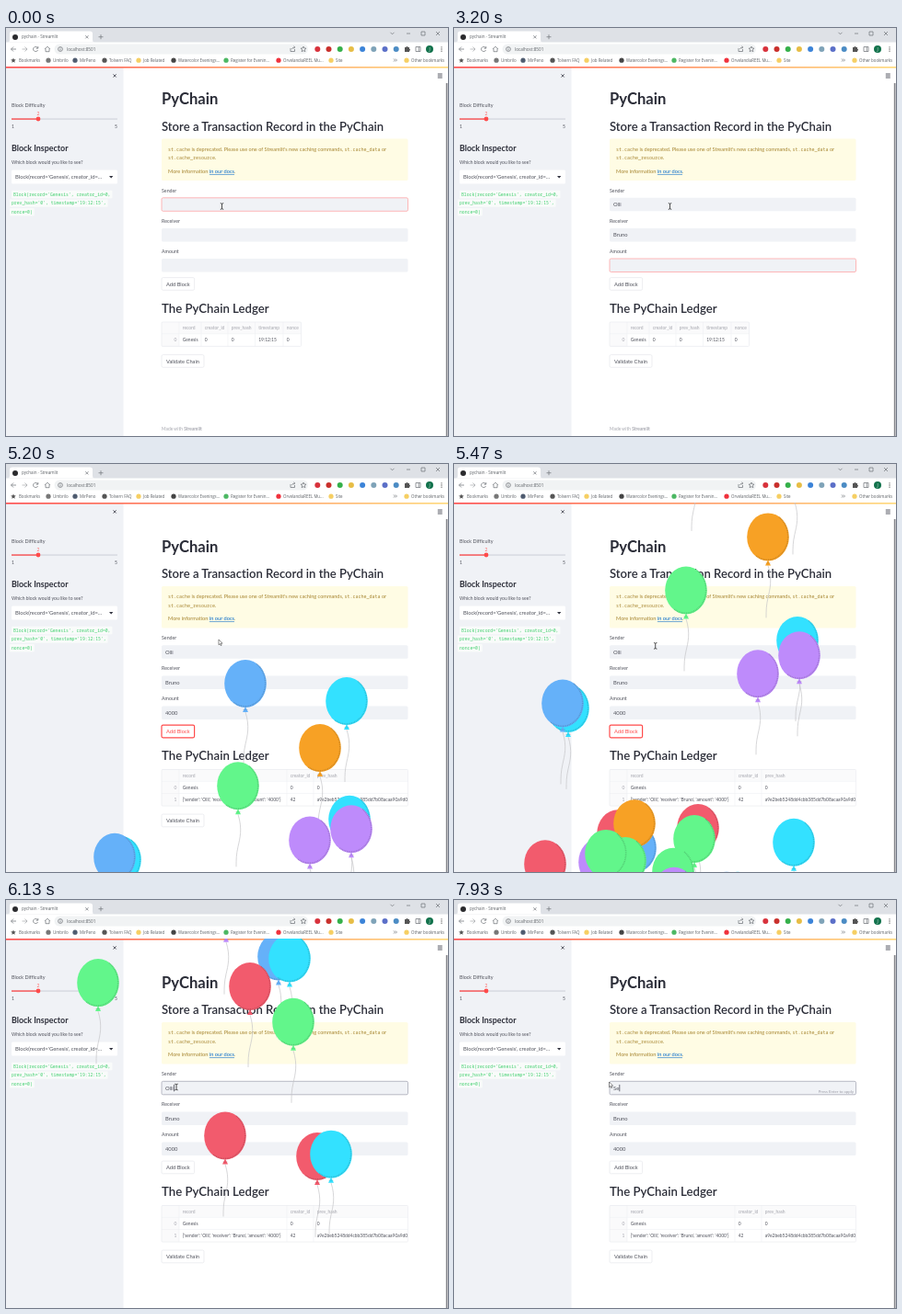
Animation of 480 by 444 pixels, one loop 8000 ms. Source, as an HTML page:

```html
<!DOCTYPE html>
<html lang="en">
<head>
<meta charset="utf-8">
<title>PyChain</title>
<style>
  html, body { margin: 0; width: 100%; height: 100%; overflow: hidden; background: #fff; }
  svg { display: block; width: 100vw; height: 100vh; }
  text { font-family: Lato, "Open Sans", sans-serif; fill: #50525c; white-space: pre; font-variant-ligatures: none; }
  text[font-weight] { fill: #2b2d38; }
  .ui { font-family: "Open Sans", "Noto Sans", sans-serif; fill: #5c6065; }
  .mono { font-family: "Noto Sans Mono", "DejaVu Sans Mono", monospace; }
  .line { fill: none; stroke: #7a7e83; stroke-width: .8; }
</style>
</head>
<body>
<svg id="stage" viewBox="0 0 480 444"></svg>
<script>
const LOOP = 8000, LAYOUT_AT = 4730, SHIFT = 12.5, COLUMN_WIDTH = 267.5;
const SENDER = "Olli", RECEIVER = "Bruno";

// Markup helpers; text is placed by its vertical centre.
const text = (x, y, size, str, attrs = "") =>
  `<text x="${x}" y="${y + size * .35}" font-size="${size}" ${attrs}>${str}</text>`;
const rect = (x, y, w, h, fill, attrs = "") =>
  `<rect x="${x}" y="${y}" width="${w}" height="${h}" fill="${fill}" ${attrs}/>`;
const dot = (x, y, r, fill) => `<circle cx="${x}" cy="${y}" r="${r}" fill="${fill}"/>`;
const line = (d, attrs = "") => `<path class="line" d="${d}" ${attrs}/>`;
const group = (id, body, attrs = "") => `<g id="${id}" ${attrs}>${body}</g>`;

function browserChrome() {
  const bookmarks = [
    [46, "#777", "Umbrilo"], [75, "#4f5c70", "MirPeno"], [107, "#555", "Tolvern FAQ"],
    [144, "#f6cf63", "Job Related"], [182, "#444", "Watercolor Evenings..."],
    [239, "#4cb863", "Register for Evenin..."], [296, "#f0313c", "OrvelandiaREEL Mu..."],
    [353, "#f6cf63", "Site"], [435, "#f6cf63", "Other bookmarks"]
  ].map(([x, color, label]) =>
    dot(x, 35.2, 2.6, color) + text(x + 5, 35.2, 4.4, label, 'class="ui"')).join("");
  const extensions = ["#d8323c", "#c9302c", "#35b04a", "#e7bd45", "#3b83d8", "#7fa3b8", "#5b6fc8", "#4b8cc4"]
    .map((color, i) => dot(338.3 + i * 12.2, 23, 3, color)).join("");
  return rect(0, 0, 480, 42, "#fff") + rect(0, 0, 480, 15.5, "#dee1e6")
    + `<path d="M2 15.5Q4 15.5 4 13V6Q4 3.5 7 3.5H91Q94 3.5 94 6V13Q94 15.5 96 15.5Z" fill="#fff"/>`
    + dot(10, 10, 3, "#2b2b2e") + text(17, 9.8, 4.6, "pychain · Streamlit", 'class="ui"')
    + line("M86.3 8.2l3.2 3.2m0-3.2l-3.2 3.2M100.5 9.7h5M103 7.2v5")
    + line("M417.5 4.8l2 2 2-2M435 6h4M451 4h4v4h-4zM467 4l4 4m0-4l-4 4")
    + line("M11 23H5.5m2.5-2.5L5.5 23 8 25.5M34.6 22a2.6 2.6 0 1 0 0 2M34.8 20v2.2h-2.2M42 23l3-2.8 3 2.8M43 22.5v3.2h4v-3.2")
    + line("M17.5 23H23m-2.5-2.5L23 23l-2.5 2.5", 'opacity=".6"')
    + rect(52.5, 17.5, 275.5, 11, "#f1f3f4", 'rx="5.5"')
    + `<circle cx="59" cy="23" r="2.4" class="line"/>` + line("M59 22.5v2M59 21.3v.6", 'stroke-width=".7"')
    + text(66, 22.9, 4.65, "localhost:8501", 'class="ui"')
    + line("M309 22v3.5h4.5V23M310.5 23q.5-2 3-2m-1-1.2l1.4 1.2-1.4 1.2")
    + line("M323 20l.9 2 2.1.2-1.6 1.4.5 2.1-1.9-1.1-1.9 1.1.5-2.1-1.6-1.4 2.1-.2z")
    + extensions
    + `<path d="M433 21h1.5a1 1 0 0 1 2 0H438v1.8a1 1 0 0 1 0 2V26h-5z" fill="#555"/>`
    + line("M445 20.5h5v5h-5zM448.2 20.5v5") + dot(460, 23, 4, "#12724c")
    + text(460, 23, 4.4, "J", 'class="ui" text-anchor="middle" style="fill:#fff"')
    + [20.8, 23, 25.2].map(y => dot(473, y, .65, "#555")).join("")
    + `<path d="M8 32.4l.8 1.9 2 .2-1.5 1.3.4 2-1.7-1-1.7 1 .4-2-1.5-1.3 2-.2z" fill="#555"/>`
    + text(14, 35.2, 4.4, "Bookmarks", 'class="ui"') + bookmarks
    + line("M421 33.5l1.5 1.5-1.5 1.5M423 33.5l1.5 1.5-1.5 1.5");
}

function sidebar() {
  const code = ["Block(record='Genesis', creator_id=0,", "prev_hash='0', timestamp='19:12:15',", "nonce=0)"]
    .map((row, i) => {
      const x = i ? 6 : 8, y = 181 + i * 9.6;
      return rect(x - 2, y - 4.2, row.length * 2.85 + 4, 8.4, "#f9fbfa", 'rx="1"')
        + text(x, y, 4.75, row, 'class="mono" style="fill:#3fcf6d"');
    }).join("");
  return rect(0, 42, 127.5, 402, "#f0f2f6")
    + line("M116.5 50.3l3.2 3.2m0-3.2l-3.2 3.2", 'style="stroke:#31333f"')
    + text(6, 84, 5.4, "Block Difficulty")
    + text(35, 93, 5, "2", 'text-anchor="middle" style="fill:#ff6b6b"')
    + rect(6, 98.4, 115, 1.3, "#d5d7df") + rect(6, 98.4, 29, 1.3, "#ff4b4b") + dot(35, 99, 2.4, "#ff4b4b")
    + text(6, 107.3, 5, "1") + text(118, 107.3, 5, "5")
    + text(6, 131, 8.9, "Block Inspector", 'font-weight="700"')
    + text(6, 146.5, 5.05, "Which block would you like to see?")
    + rect(6, 154.5, 115, 15, "#fff", 'rx="1.5"')
    + text(10, 162, 5.9, "Block(record='Genesis', creator_id=...")
    + `<path d="M112 161h4.4l-2.2 2.4z" fill="#31333f"/>` + code;
}

function field(name, label, y) {
  return text(169, y - 8, 5.3, label)
    + rect(169, y, COLUMN_WIDTH, 14.5, "#f0f2f6", `rx="1.5" id="${name}Box"`)
    + rect(0, y + 3.5, 0, 7.5, "#0078d7", `id="${name}Selection"`)
    + text(173, y + 7.2, 5.8, "", `id="${name}Text"`)
    + rect(0, y + 3.6, .7, 7.4, "#31333f", `id="${name}Caret"`)
    + text(434, y + 11, 4.4, "Press Enter to apply", `id="${name}Hint" text-anchor="end" style="fill:#9b9ca6"`);
}

const button = (id, y, w, label) =>
  rect(169, y, w, 13.7, "#fff", `id="${id}Box" rx="1.5" stroke="#e6e7eb" stroke-width=".7"`)
  + text(169 + w / 2, y + 6.9, 5.75, label, `id="${id}Text" text-anchor="middle"`);

// Columns are [left edge, heading, ...cells]; the first holds the row index.
function table(right, columns) {
  const rows = columns[0].length - 2, bottom = 320 + 13.2 * (rows + 1);
  const grid = 'style="stroke:#eff0f3;stroke-width:.6"';
  let out = rect(169, 320, right - 169, 12.8, "#fafafb") + rect(169, 320, 19, bottom - 320, "#fafafb");
  columns.forEach(([x, ...cells], col) => {
    if (col) out += line(`M${x} 320V${bottom}`, grid);
    cells.forEach((cell, row) => out += text(col ? x + 3.7 : 182.5, 326.3 + row * 13.2, 4.95, cell,
      row && col ? "" : 'style="fill:#a5a6ae"'));
  });
  for (let row = 1; row <= rows; row++) out += line(`M169 ${319.6 + row * 13.2}H${right}`, grid);
  return out + rect(169, 320, right - 169, bottom - 320, "none", 'rx="1" stroke="#eaebef" stroke-width=".7"');
}

function mainPage() {
  const code = s => `<tspan class="mono" font-size="5">${s}</tspan>`;
  const amber = 'style="fill:#a5842f"';
  const record = `{'sender': '${SENDER}', 'receiver': '${RECEIVER}', 'amount': '4000'}`;
  return text(169, 77.3, 16.6, "PyChain", 'font-weight="700"')
    + text(169, 107, 13.1, "Store a Transaction Record in the PyChain", 'font-weight="600"')
    + rect(169, 120.5, COLUMN_WIDTH, 45.5, "#fffce4", 'rx="1.5"')
    + text(176, 131.8, 5.55, `${code("st.cache")} is deprecated. Please use one of Streamlit's new caching commands, ${code("st.cache_data")} or`, amber)
    + text(176, 141.3, 5.55, code("st.cache_resource") + ".", amber)
    + text(176, 156, 5.65, 'More information <tspan fill="#0068c9" text-decoration="underline">in our docs</tspan>.', amber)
    + field("sender", "Sender", 184.8) + field("receiver", "Receiver", 218) + field("amount", "Amount", 251)
    + button("add", 271.6, 35.6, "Add Block")
    + text(169, 305.2, 13.2, "The PyChain Ledger", 'font-weight="600"')
    + group("ledgerBefore", table(320.5, [
        [169, "", "0"], [188, "record", "Genesis"], [212, "creator_id", "0"],
        [241, "prev_hash", "0"], [270.5, "timestamp", "19:12:15"], [301, "nonce", "0"]])
      + text(169, 436.5, 4.9, 'Made with <tspan font-weight="700">Streamlit</tspan>', 'style="fill:#a5a6ae"'))
    + group("ledgerAfter", table(436.5, [
        [169, "", "0", "1"], [188, "record", "Genesis", record], [305, "creator_id", "0", "42"],
        [334, "prev_hash", "0", "a9e2beb5248dd4cbb385dd7b08acaa90a9d05c1e7"]]), 'clip-path="url(#column)"')
    + group("validate", button("check", 355.6, 46, "Validate Chain"));
}

// Balloons: x centre, launch time, colour; later entries lie in front.
const COLORS = { b: "#65b1f9", c: "#33e1ff", o: "#f7a125", g: "#62f68b", p: "#be8bfb", r: "#f25b6d" };
const BALLOONS = [
  [260, 4724, "b"], [370, 4748, "c"], [341, 4816, "o"], [252, 4877, "g"], [373, 4938, "c"],
  [330, 4981, "p"], [375, 4957, "p"], [124, 5028, "c"], [118, 5021, "b"],
  [178, 5237, "r"], [197, 5269, "b"], [196, 5216, "o"], [158, 5304, "p"], [186, 5301, "g"],
  [165, 5282, "g"], [265, 5225, "r"], [261, 5248, "g"], [369, 5256, "c"], [99, 5309, "r"],
  [238, 5332, "g"], [239, 5412, "p"], [296, 5458, "b"], [308, 5460, "c"], [265, 5491, "r"],
  [100, 5487, "g"], [312, 5532, "g"], [238, 5676, "r"], [338, 5705, "r"], [353, 5702, "c"]
];
const RISE_MS = 775, RISE_FROM = 444, RISE_BY = 516;

const balloon = color => `<g class="balloon">
  <path d="M0 57c5 16 2 26 0 35s-2 14-2 22" fill="none" stroke="#c4c4c8" stroke-width=".7"/>
  <path d="M0 51l-3 6h6z" fill="${color}"/>
  <ellipse cy="26" rx="22.8" ry="26" fill="${color}"/>
  <path d="M12 4.5A22.2 25.4 0 0 1-13 46.5" fill="none" stroke="#000" stroke-opacity=".16" stroke-width="1.6" stroke-dasharray="1 .7"/>
  <path d="M-3 54.5h6" stroke="#000" stroke-opacity=".12" stroke-width=".8"/></g>`;

// CSS ease-in: cubic-bezier(.42, 0, 1, 1), solved by bisection.
function easeIn(x) {
  let lo = 0, hi = 1;
  for (let i = 0; i < 22; i++) {
    const s = (lo + hi) / 2;
    if (1.26 * s + .48 * s * s - .74 * s ** 3 < x) lo = s; else hi = s;
  }
  return 3 * lo * lo - 2 * lo ** 3;
}

document.getElementById("stage").innerHTML = `<defs>
    <linearGradient id="accent"><stop stop-color="#ff4b4b"/><stop offset="1" stop-color="#ffd97a"/></linearGradient>
    <clipPath id="page"><rect y="42" width="480" height="402"/></clipPath>
    <clipPath id="column"><rect x="168" y="300" width="268.9" height="100"/></clipPath>
  </defs>`
  + rect(0, 0, 480, 444, "#fff") + group("main", mainPage()) + sidebar()
  + rect(0, 42, 480, 1.6, "url(#accent)")
  + line("M468.8 50h5M468.8 52h5M468.8 54h5", 'style="stroke:#31333f"')
  + rect(477.8, 60, 1.7, 384, "#85868c")
  + group("running", `<circle cx="407" cy="51.5" r="3.4" class="line"/>` + line("M403 55h8M407 48v5")
    + text(415, 51.5, 5, "Running...") + text(448, 51.5, 5, "Stop"), 'opacity=".2"')
  + group("balloons", BALLOONS.map(b => balloon(COLORS[b[2]])).join(""), 'clip-path="url(#page)"')
  + browserChrome()
  + group("beam", line("M-1.7-3.3Q0-3.3 0-2.4V2.4Q0 3.3-1.7 3.3M1.7-3.3Q0-3.3 0-2.4M0 2.4Q0 3.3 1.7 3.3", 'style="stroke:#222"'))
  + group("arrow", '<path d="M0 0v5.8l1.4-1.2.9 2 .9-.4-.9-2h1.8z" fill="#fff" stroke="#222" stroke-width=".5"/>');

const el = id => document.getElementById(id);
const show = (node, on) => node.style.display = on ? "" : "none";
const within = (t, from, to) => t >= from && t < to;
const balloonNodes = [...document.querySelectorAll(".balloon")];

// Each typing run: the final text and the moment of each key.
const TYPING = {
  sender: [[SENDER, [270, 530, 800, 930]], ["Se", [7530, 7800]]],
  receiver: [[RECEIVER, [1600, 1800, 2000, 2200, 2400]]],
  amount: [["4000", [3270, 3470, 3600, 3730]]]
};
const FOCUS = [[0, "sender"], [1200, "receiver"], [2800, "amount"], [4270, "add"], [6000, "sender"]];
const POINTER = [[5070, 234.5, 194], [5200, 231, 191], [5730, 207, 204.5], [6000, 185, 203.5],
  [6200, 185, 203.5], [6530, 169, 203.5], [6670, 168.5, 198]];
const RUNNING = [[1270, 1530], [2870, 3200], [4400, LAYOUT_AT]];

function pointerAt(t) {
  const next = POINTER.findIndex(p => p[0] > t);
  if (next < 1) return POINTER[next ? POINTER.length - 1 : 0].slice(1);
  const [t0, x0, y0] = POINTER[next - 1], [t1, x1, y1] = POINTER[next];
  const k = (t - t0) / (t1 - t0);
  return [x0 + (x1 - x0) * k, y0 + (y1 - y0) * k];
}

function drawField(name, t, focused, pointerX) {
  const [word, keys] = TYPING[name].filter(run => run[1][0] <= t).pop() || ["", []];
  const typed = keys.filter(k => k <= t);
  const label = el(name + "Text"), box = el(name + "Box"), selection = el(name + "Selection");
  label.textContent = word.slice(0, typed.length);
  const end = 173 + (typed.length ? label.getComputedTextLength() : 0);

  const selecting = name === "sender" && within(t, 6200, 7530);
  const left = Math.max(173, Math.min(end, pointerX));
  selection.setAttribute("x", left);
  selection.setAttribute("width", selecting ? end - left : 0);
  label.style.fill = selecting && left < 175 ? "#fff" : "";

  const clicked = name === "sender" && within(t, 6050, 6200);
  el(name + "Caret").setAttribute("x", end + .3);
  show(el(name + "Caret"), focused && (clicked || typed.length && t - typed.at(-1) < 500));
  show(el(name + "Hint"), focused && typed.length && !within(t, 5000, 7530));
  box.setAttribute("stroke", focused ? (t < 5000 ? "#ffa6a8" : "#a9aab8") : "none");
  box.setAttribute("stroke-width", .8);
}

function draw(t) {
  const added = t >= LAYOUT_AT;
  el("main").setAttribute("transform", `translate(0 ${added ? SHIFT : 0})`);
  el("validate").setAttribute("transform", `translate(0 ${added ? 13 : 0})`);
  show(el("ledgerBefore"), !added);
  show(el("ledgerAfter"), added);
  show(el("running"), RUNNING.some(([from, to]) => within(t, from, to)));

  const focus = FOCUS.filter(f => f[0] <= t).pop()[1];
  const [px, py] = pointerAt(t);
  for (const name in TYPING) drawField(name, t, focus === name, px);
  const pressed = focus === "add";
  el("addBox").setAttribute("stroke", pressed ? "#ff4b4b" : "#e6e7eb");
  el("addBox").setAttribute("stroke-width", pressed ? 1.2 : .7);
  el("addText").style.fill = pressed ? "#ff4b4b" : "";

  const isArrow = within(t, LAYOUT_AT, 5400) || t >= 6600;
  for (const id of ["beam", "arrow"]) el(id).setAttribute("transform", `translate(${px} ${py})`);
  show(el("arrow"), isArrow);
  show(el("beam"), !isArrow);

  BALLOONS.forEach(([x, start], i) => {
    const k = (t - start) / RISE_MS, node = balloonNodes[i];
    show(node, k > 0 && k < 1);
    node.setAttribute("transform", `translate(${x} ${RISE_FROM - RISE_BY * easeIn(k)})`);
  });
}

const startTime = performance.now();
function frame() {
  draw((performance.now() - startTime) % LOOP);
  requestAnimationFrame(frame);
}
frame();
</script>
</body>
</html>
```
